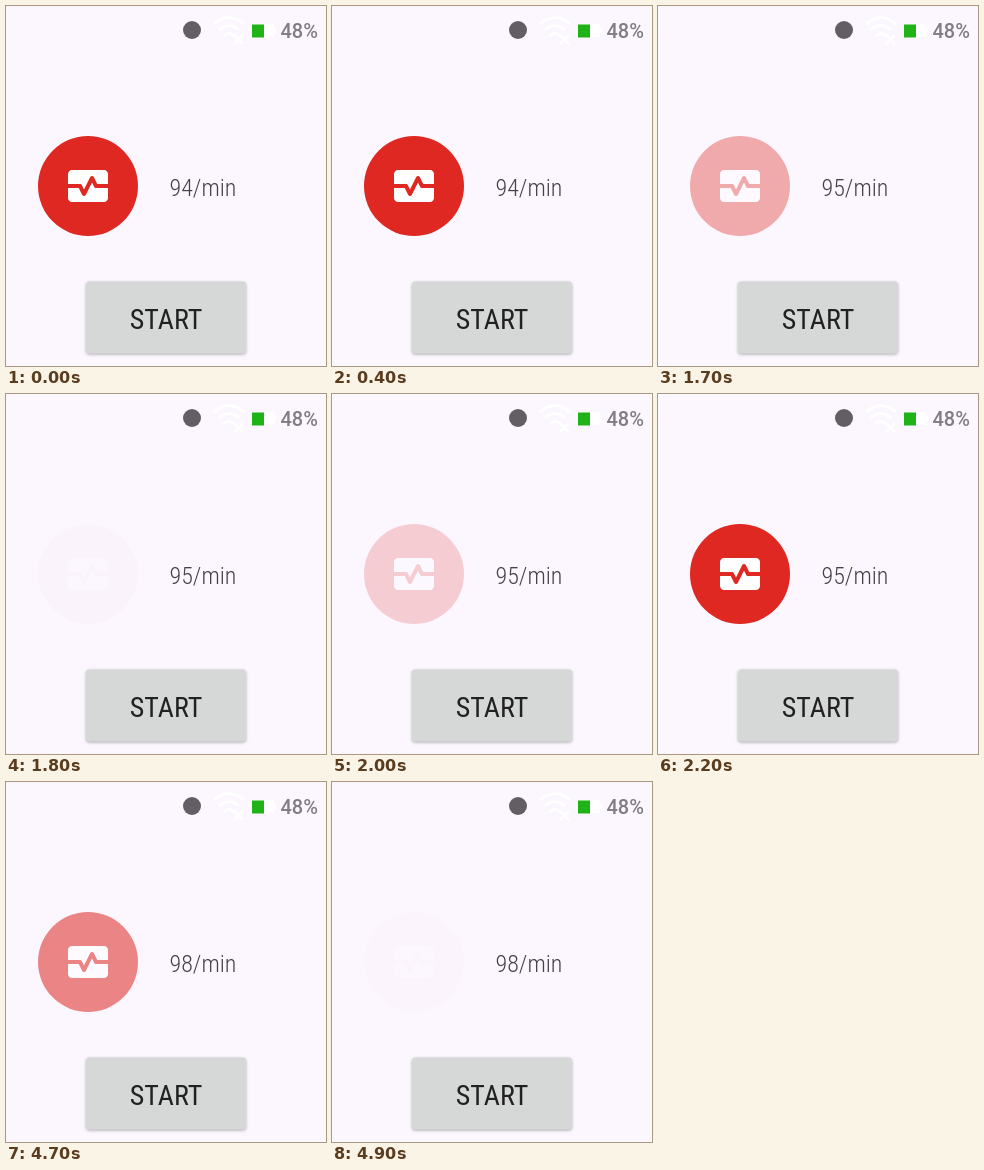
An HTML page for the animation above (5000 ms loop, 320 by 360 pixels).

```html
<!DOCTYPE html>
<html lang="en">
<head>
<meta charset="utf-8">
<title>Heart rate</title>
<style>
  html, body { margin: 0; width: 100%; height: 100%; overflow: hidden; background: #fcf7ff; }
  svg { display: block; width: 320px; height: 360px; }
  text { font-family: "Roboto Condensed", Roboto, sans-serif; font-stretch: 75%; }
  .battery { font: 500 20px Roboto, sans-serif; font-stretch: 100%; fill: #817d82; }
  .rate { font-size: 24px; font-weight: 300; fill: #444246; }
  .label { font-size: 28px; font-weight: 400; fill: #212121; text-anchor: middle; }
  .button { fill: #d6d7d7; filter: drop-shadow(0 1px 1.5px rgba(0, 0, 0, .3)); }

  .beat, .rate { animation: 5s step-end infinite; }
  .beat { animation-name: beat; }
  .first { animation-name: first; }
  .second { animation-name: second; }
  .third { animation-name: third; }

  /* 2% is one 100 ms tick; the fades follow a cosine ease */
  @keyframes beat {
    0% { opacity: 1; }
    2% { opacity: .01; }
    4% { opacity: .25; }
    6% { opacity: .75; }
    8% { opacity: 1; }
    32% { opacity: .84; }
    34% { opacity: .37; }
    36% { opacity: .012; }
    40% { opacity: .2; }
    42% { opacity: .7; }
    44% { opacity: 1; }
    92% { opacity: .95; }
    94% { opacity: .55; }
    96% { opacity: .1; }
    98%, 100% { opacity: .01; }
  }
  @keyframes first {
    0% { opacity: 1; }
    32%, 100% { opacity: 0; }
  }
  @keyframes second {
    0% { opacity: 0; }
    32% { opacity: 1; }
    92%, 100% { opacity: 0; }
  }
  @keyframes third {
    0% { opacity: 0; }
    92%, 100% { opacity: 1; }
  }
</style>
</head>
<body>
<svg viewBox="0 0 320 360">
  <rect width="320" height="360" fill="#fcf7ff"/>

  <circle cx="186" cy="24" r="9" fill="#625e63"/>

  <g fill="none" stroke="#fff" stroke-width="3">
    <path d="M208 18Q223 5 238 18M213 24Q223 15 233 24M218 30Q223 25 228 30"/>
    <path d="M228 29l9 9m0-9l-9 9" stroke-width="2.5"/>
  </g>

  <path d="M258 18h10v3h2v7h-2v3h-10z" fill="#fff"/>
  <rect x="246" y="18.5" width="12" height="13" fill="#1fb317"/>
  <text class="battery" x="274.5" y="32">48%</text>

  <g class="beat">
    <circle cx="82" cy="180" r="50" fill="#de2821"/>
    <g transform="translate(58 156) scale(2)" fill="#fff">
      <path d="M20 4H4c-1.1 0-2 .9-2 2v5h6c.38 0 .73.21.89.55L10 13.76l3.11-6.21c.34-.68 1.45-.68 1.79 0L16.62 11H22V6c0-1.1-.9-2-2-2z"/>
      <path d="M15.11 12.45L14 10.24l-3.11 6.21c-.34.68-1.45.68-1.79 0L7.38 13H2v5c0 1.1.9 2 2 2h16c1.1 0 2-.9 2-2v-5h-6c-.38 0-.73-.21-.89-.55z"/>
    </g>
  </g>

  <text class="rate first" x="163.5" y="190">94/min</text>
  <text class="rate second" x="163.5" y="190">95/min</text>
  <text class="rate third" x="163.5" y="190">98/min</text>

  <rect class="button" x="80" y="275.5" width="160" height="72" rx="3.5"/>
  <text class="label" x="160" y="323">START</text>
</svg>
</body>
</html>
```
